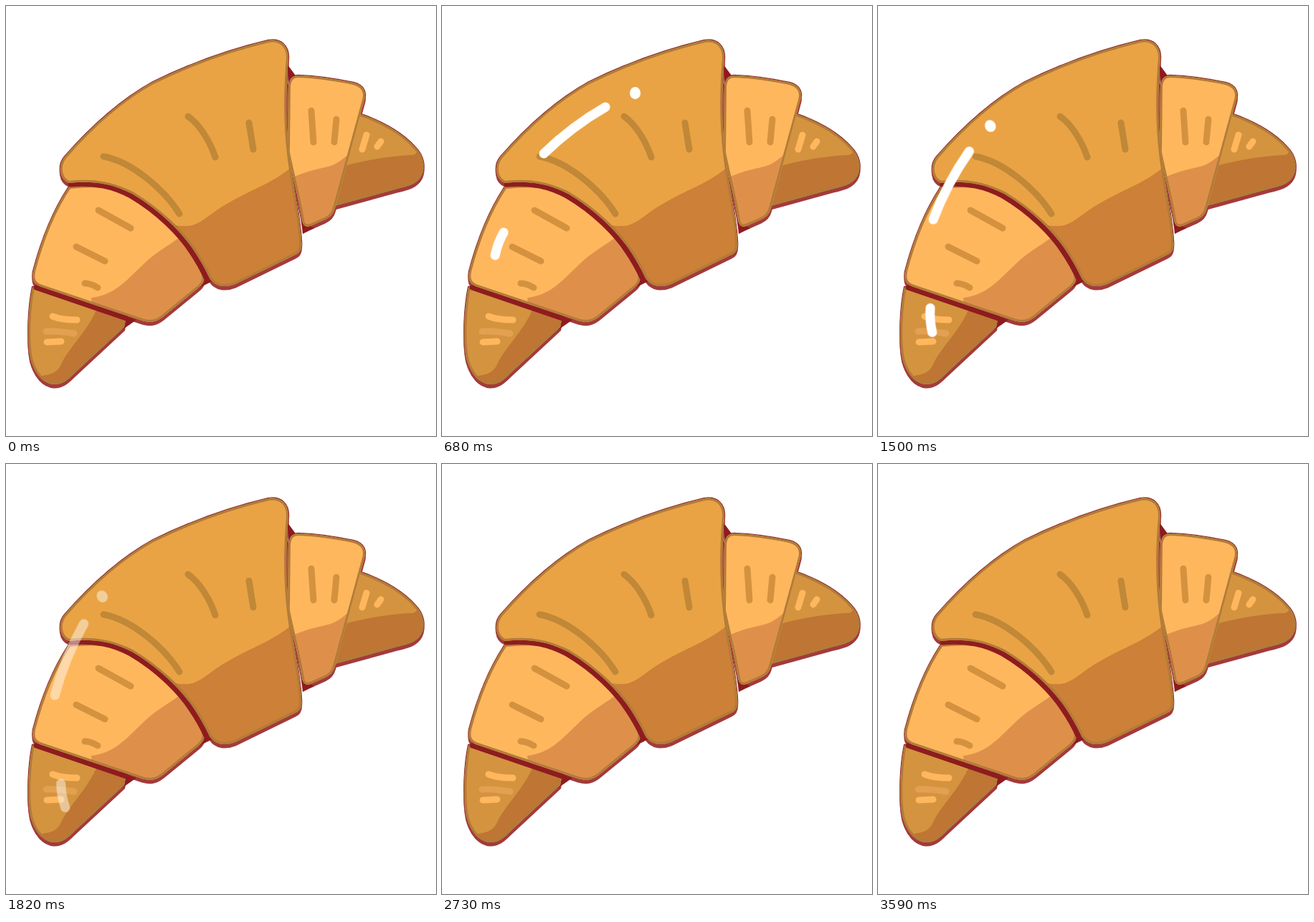
These frames come from a looping animation (600 px wide and 600 px high, 3.63 s). An HTML page:

```html
<!DOCTYPE html>
<html lang="en">
<head>
<meta charset="utf-8">
<title>Croissant</title>
<style>
  html, body { margin: 0; width: 100%; height: 100%; overflow: hidden; background: #fff; }
  svg { display: block; width: 100vw; height: 100vh; }
  path { stroke-linecap: round; stroke-linejoin: round; }
  .shadow { fill: #a33b3c; stroke: #a33b3c; stroke-width: 2; }
  .gap { fill: #8e1c1f; stroke: none; }
  .seam { fill: none; stroke: #8e1c1f; stroke-width: 7; }
  .edge { fill: none; stroke: #b17c38; stroke-width: 6; }
  .rim { fill: none; stroke: #8a2a2c; stroke-width: 2.4; }
  .dark { fill: #d4933f; }
  .dark-shade { fill: #bf7533; }
  .light { fill: #ffb75e; }
  .light-shade { fill: #de904b; }
  .main { fill: #e9a345; }
  .main-shade { fill: #cd8037; }
  .mark { fill: none; stroke-width: 9; }
  .shine {
    fill: none; stroke: #fff; stroke-width: 13;
    transform-origin: 316.5px 398px;
    animation: sweep 3630ms infinite, fade 3630ms linear infinite;
  }
  @keyframes sweep {
    0% { transform: rotate(10.5deg); animation-timing-function: cubic-bezier(.37, 0, .63, 1); }
    56.6%, 100% { transform: rotate(-32.2deg); }
  }
  @keyframes fade {
    0% { opacity: 0; }
    13%, 44% { opacity: 1; }
    55.5%, 100% { opacity: 0; }
  }
</style>
</head>
<body>
<svg viewBox="0 0 600 600">
  <defs>
    <path id="rightTip" d="M490 149 L498 152 C530 163 556 180 571 197 C583 209 586 226 579 238 C573 248 563 251 546 255 L455 280 Z"/>
    <path id="rightFold" d="M394 112 C395 101 400 96 410 97 C436 98 460 102 485 107 C500 111 504 121 499 135 C486 182 472 235 459 282 C457 290 452 295 445 298 L427 306 C418 310 414 306 413 298 C407 262 399 235 393 204 Z"/>
    <path id="leftTip" d="M37 392 C31 420 29 468 34 492 C40 514 52 527 67 528 C79 528 86 522 95 513 L165 448 L168 433 L50 391 Z"/>
    <path id="leftFold" d="M88 252 C64 288 49 328 38 370 C36 381 38 387 47 391 L190 439 C203 443 211 440 220 433 L270 392 C278 385 278 378 274 369 C255 331 215 285 166 258 C145 249 115 249 88 252 Z"/>
    <path id="body" d="M88 247 C74 242 72 222 82 210 C117 170 160 131 205 106 C260 79 315 60 366 48 C384 45 395 56 394 74 C390 120 390 162 395 205 C400 250 410 290 412 328 C413 338 411 344 404 347 L320 388 C305 394 292 391 285 381 C280 371 272 355 261 339 C245 316 215 285 176 262 C150 249 125 243 88 247 Z"/>
    <clipPath id="inRightTip"><use href="#rightTip"/></clipPath>
    <clipPath id="inRightFold"><use href="#rightFold"/></clipPath>
    <clipPath id="inLeftTip"><use href="#leftTip"/></clipPath>
    <clipPath id="inLeftFold"><use href="#leftFold"/></clipPath>
    <clipPath id="inBody"><use href="#body"/></clipPath>
  </defs>

  <g class="rim">
    <use href="#rightTip"/><use href="#rightFold"/><use href="#leftTip"/><use href="#leftFold"/><use href="#body"/>
  </g>
  <g class="shadow" transform="translate(0 4.5)">
    <use href="#rightTip"/><use href="#rightFold"/><use href="#leftTip"/><use href="#leftFold"/><use href="#body"/>
  </g>
  <path class="gap" d="M393 82 L404 97 L394 110 Z M412 300 L414 318 L430 310 Z M160 430 L182 438 L162 452 Z M270 372 L288 384 L268 394 Z"/>

  <use class="dark" href="#rightTip"/>
  <path class="dark-shade" clip-path="url(#inRightTip)" d="M465 225 C500 215 537 209 568 208 C574 207 574 200 576 196 L600 200 V300 H440 Z"/>
  <use class="edge" href="#rightTip" clip-path="url(#inRightTip)"/>
  <path class="mark" stroke="#ffb75e" stroke-width="8" d="M503 180 L497 200 M523 189 L518 196"/>

  <use class="light" href="#rightFold"/>
  <path class="light-shade" clip-path="url(#inRightFold)" d="M395 242 C420 228 445 227 458 221 C468 216 475 209 484 202 L480 310 H400 Z"/>
  <use class="edge" href="#rightFold" clip-path="url(#inRightFold)"/>
  <path class="mark" stroke="#d4923f" d="M426 146 L429 190 M461 158 L458 190"/>

  <use class="dark" href="#leftTip"/>
  <path class="dark-shade" clip-path="url(#inLeftTip)" d="M128 420 C114 454 88 476 77 500 C70 515 58 514 46 517 L60 535 H100 L180 450 V425 Z"/>
  <use class="edge" href="#leftTip" clip-path="url(#inLeftTip)"/>
  <path class="mark" stroke="#ffb75e" d="M65 433 C75 437 88 438 99 438 M57 469 L77 468"/>
  <path class="mark" stroke="#e3a050" d="M56 454 C70 453 82 455 95 457"/>
  <path class="seam" d="M42 393 L168 436"/>

  <use class="light" href="#leftFold"/>
  <path class="light-shade" clip-path="url(#inLeftFold)" d="M119 407 C150 404 167 384 192 360 C208 344 228 334 246 320 L290 370 L210 450 L120 418 Z"/>
  <use class="edge" href="#leftFold" clip-path="url(#inLeftFold)"/>
  <path class="mark" stroke="#d4923f" d="M129 285 L174 310 M98 336 L138 356 M110 387 C117 387 123 390 128 393"/>
  <path class="seam" d="M90 249 C125 246 150 252 174 265 C213 288 243 319 258 342 C269 358 276 372 281 383"/>

  <use class="main" href="#body"/>
  <path class="main-shade" clip-path="url(#inBody)" d="M232 305 C240 307 250 308 260 306 C278 300 286 288 310 275 C338 258 375 246 399 224 L430 400 H280 Z"/>
  <use class="edge" href="#body" clip-path="url(#inBody)"/>
  <path class="mark" stroke="#c08837" d="M254 154 C271 166 285 190 292 211 M339 163 L345 200 M136 210 C175 217 220 255 242 290"/>

  <g class="shine">
    <path d="M142 206 Q181 168 228 141"/>
    <path d="M74 348 Q78 330 86 316"/>
    <ellipse cx="269.5" cy="121.5" rx="7.5" ry="8.5" fill="#fff" stroke="none"/>
  </g>
</svg>
</body>
</html>
```
